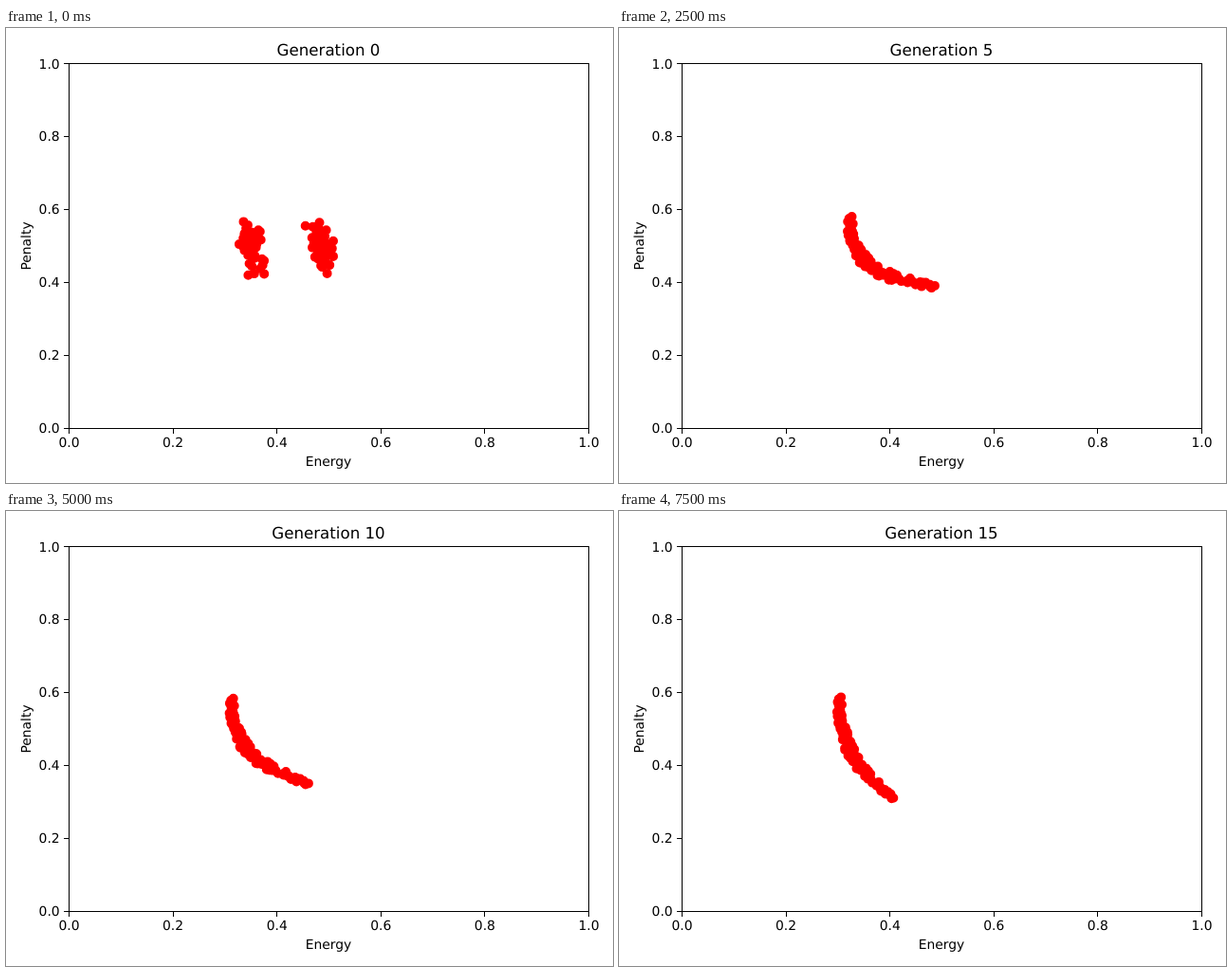
These frames come from a looping animation (640x480 px, 8000 ms). An HTML page:

```html
<!DOCTYPE html>
<html lang="en">
<head>
<meta charset="utf-8">
<title>Population scatter</title>
<style>
  html, body { margin: 0; width: 100%; height: 100%; overflow: hidden; background: #fff; }
  svg { display: block; width: 640px; height: 480px; }
  text { font: 13.89px "DejaVu Sans", sans-serif; text-anchor: middle; text-rendering: geometricPrecision; }
  #title { font-size: 16.67px; }
  #axes { fill: none; stroke: #000; stroke-width: 1; shape-rendering: crispEdges; }
  #dots { fill: none; stroke: #f00; stroke-width: 10; stroke-linecap: round; }
</style>
</head>
<body>
<svg viewBox="0 0 640 480">
  <path id="dots"/>
  <path id="axes"/>
  <g id="labels"></g>
  <text id="title" x="340" y="29"></text>
  <text x="340" y="462">Energy</text>
  <text transform="translate(26 230) rotate(-90)">Penalty</text>
</svg>
<script>
const GENERATIONS = 16, STEP = 500, DOTS = 100;
const LEFT = 66.5, RIGHT = 614.5, TOP = 37.5, BOTTOM = 422.4;
const byId = id => document.getElementById(id);
const lerp = (a, b, t) => a + (b - a) * t;
const snap = v => Math.floor(v) + 0.5;

function randomFrom(seed) {
  return () => (seed = (seed * 16807) % 2147483647) / 2147483647;
}

// The first generation: two tall, slightly leaning clouds.
function clouds() {
  const random = randomFrom(4021);
  const bell = () => random() + random() + random() - 1.5;
  return Array.from({ length: DOTS }, (_, i) => {
    const dy = 27 * bell(), dx = 11 * bell() + 0.2 * dy;
    return i % 2 ? [333 + dx, 232 + dy] : [258 + dx, 229 + dy];
  });
}

// Control points of the front, drifting down and left over the generations.
function frontAt(generation) {
  const t = (generation - 3) / 12;
  return [
    [lerp(245, 232, t), lerp(199, 196, t)],
    [lerp(247, 232, t), lerp(242, 238, t)],
    [lerp(265, 246, t), lerp(262, 272, t)],
    [335 - 45 * t * Math.abs(t), lerp(266, 303, t)]
  ];
}

function bezier(points, u) {
  const v = 1 - u, weights = [v * v * v, 3 * v * v * u, 3 * v * u * u, u * u * u];
  return [0, 1].map(axis => points.reduce((sum, p, i) => sum + p[axis] * weights[i], 0));
}

// Dots spread around the front, thickest in the middle and in early generations.
function front(generation) {
  const random = randomFrom(4021), controls = frontAt(generation);
  return Array.from({ length: DOTS }, (_, i) => {
    const u = i / (DOTS - 1), [x, y] = bezier(controls, u);
    const spread = 2 + 3 * Math.sin(Math.PI * u) + 4 / generation;
    const angle = random() * 2 * Math.PI, r = spread * Math.sqrt(random());
    return [x + r * Math.cos(angle), y + r * Math.sin(angle)];
  });
}

function drawAxes() {
  let path = `M${LEFT} ${TOP}H${RIGHT}V${snap(BOTTOM)}H${LEFT}Z`, labels = "";
  for (let i = 0; i <= 5; i++) {
    const x = lerp(LEFT, RIGHT, i / 5), y = lerp(BOTTOM, TOP, i / 5);
    const value = (i / 5).toFixed(1);
    path += `M${snap(x)} 423v5M61 ${snap(y)}h5`;
    labels += `<text x="${x}" y="442">${value}</text>` +
      `<text x="56.7" y="${Math.round(y + 5)}" style="text-anchor:end">${value}</text>`;
  }
  byId("axes").setAttribute("d", path);
  byId("labels").innerHTML = labels;
}

let shown = -1;
function show(generation) {
  if (generation === shown) return;
  shown = generation;
  const dots = generation ? front(generation) : clouds();
  byId("title").textContent = `Generation ${generation}`;
  byId("dots").setAttribute("d",
    dots.map(([x, y]) => `M${x.toFixed(1)} ${y.toFixed(1)}h.01`).join(""));
}

const start = performance.now();
function tick() {
  const time = Math.max(0, performance.now() - start);
  show(Math.floor(time / STEP) % GENERATIONS);
  requestAnimationFrame(tick);
}

drawAxes();
show(0);
requestAnimationFrame(tick);
</script>
</body>
</html>
```
